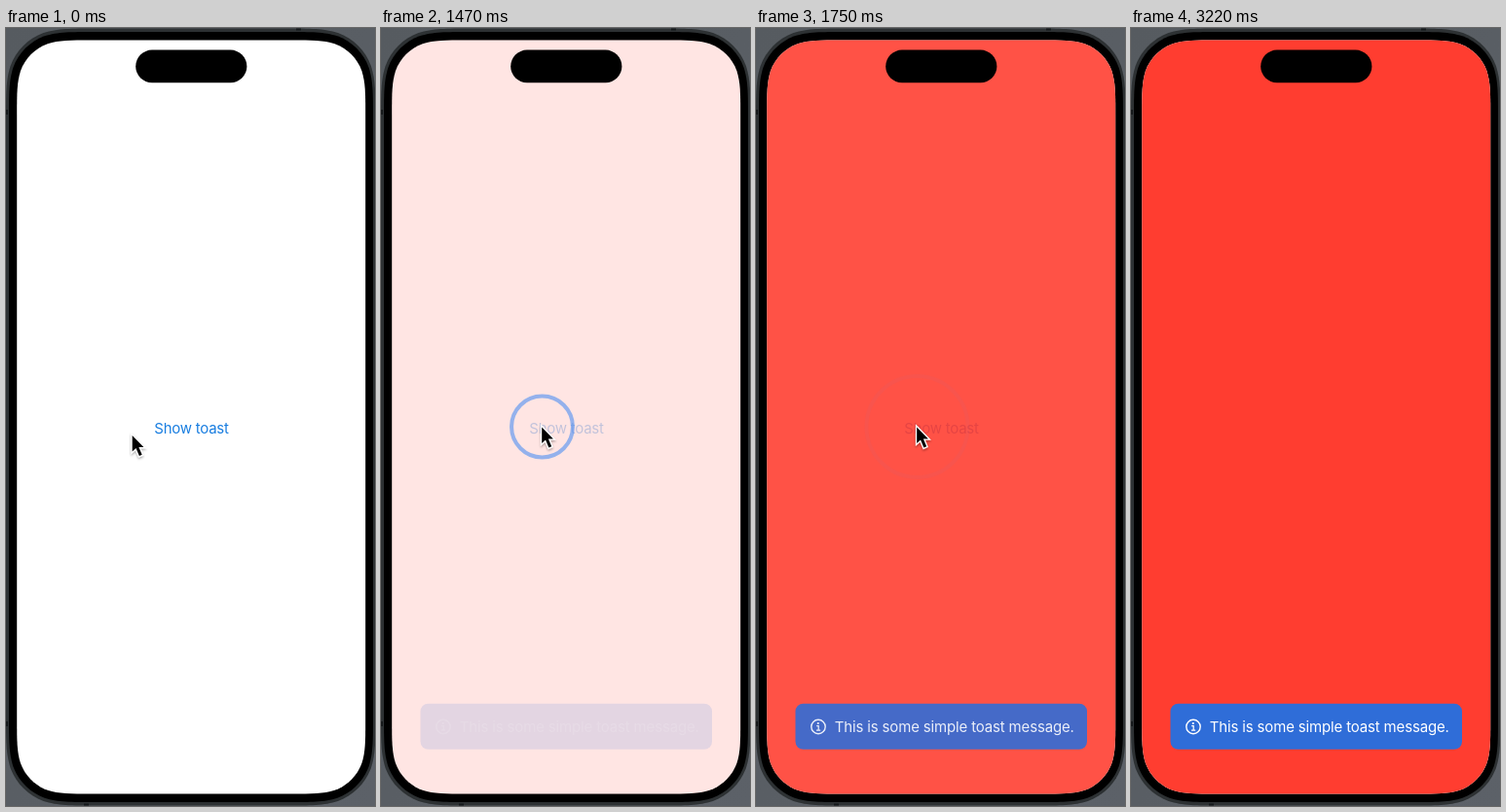
An HTML page for the animation above (3640 ms loop, 379x800 px).

```html
<!DOCTYPE html>
<html lang="en">
<head>
<meta charset="utf-8">
<title>Toast demo</title>
<style>
  html, body { margin: 0; width: 100%; height: 100%; overflow: hidden; background: #595e64; }
  svg { display: block; width: 100%; height: 100%; }
  text { font-family: Inter, "Liberation Sans", sans-serif; font-size: 15px; }
</style>
</head>
<body>
<svg viewBox="0 0 379 800">
  <defs>
    <linearGradient id="desk" x1="0" y1="0" x2="1" y2="1">
      <stop offset="0" stop-color="#565b60"/>
      <stop offset="1" stop-color="#5c6168"/>
    </linearGradient>
    <filter id="shadow" x="-50%" y="-50%" width="200%" height="200%">
      <feDropShadow dx="0" dy="1.5" stdDeviation="1.2" flood-opacity=".35"/>
    </filter>
  </defs>
  <rect width="379" height="800" fill="url(#desk)"/>
  <path id="body" fill="#2d3133"/>
  <path d="M298 1.5h5M80 798.5h5M1 84v5M1 713v5" stroke="#15181a" stroke-width="2"/>
  <path id="bezel"/>
  <path id="screen" fill="#fff"/>
  <text id="button" x="190.5" y="417" text-anchor="middle" fill="#1a7ee0" letter-spacing="-.25">Show toast</text>
  <path id="cover" fill="#ff3d30"/>
  <rect x="133.2" y="22.6" width="114.2" height="33.6" rx="16.8"/>
  <rect id="toast" x="40.5" y="694.7" width="299.5" height="47.1" rx="8" fill="#2f6dd8"/>
  <g id="label" fill="#fff">
    <circle cx="64" cy="718.5" r="7.2" fill="none" stroke="#fff" stroke-width="1.4"/>
    <circle cx="63.8" cy="715" r="1.1"/>
    <path d="M62.2 717.6h2v4.4M62 722.1h4.2" fill="none" stroke="#fff" stroke-width="1.2"/>
    <text x="80.8" y="724" letter-spacing="-.16">This is some simple toast message.</text>
  </g>
  <circle id="ring" cx="165.5" cy="410" fill="none" stroke="#3c87f5" stroke-width="4"/>
  <g id="cursor" filter="url(#shadow)">
    <path d="M1.2 2.9V19.6L5 16 8.4 24 11.2 22.8 7.9 15H12.9Z" stroke="#fff" stroke-width="2.6" paint-order="stroke"/>
  </g>
</svg>
<script>
const LOOP = 3640, STEP = 70;
const $ = id => document.getElementById(id);
const clamp = v => Math.min(1, Math.max(0, v));
const span = (t, a, b) => clamp((t - a) / (b - a));
const smooth = u => u * u * (3 - 2 * u);

// Half of a continuous corner, in radii: distance along each edge from the corner
const CORNER = [
  [0, 1.5287], [0, 1.0885], [0, 0.8684], [0.0749, 0.6315], [0.1691, 0.3728]
];

// Box with four continuous corners of radius r
function squircle(x, y, w, h, r) {
  const mirror = CORNER.map(([a, b]) => [b, a]).reverse();
  const curve = [...CORNER, ...mirror];
  const corner = (px, py, sx, sy, pts) =>
    pts.map(([a, b]) => `${px + sx * a * r} ${py + sy * b * r}`);
  const back = [...curve].reverse();
  const corners = [
    corner(x, y, 1, 1, curve),
    corner(x + w, y, -1, 1, back),
    corner(x + w, y + h, -1, -1, curve),
    corner(x, y + h, 1, -1, back)
  ];
  return 'M' + corners.map(([from, ...rest]) => `${from}C${rest.join(' ')}`).join('L') + 'Z';
}

// Critically damped spring, 0 to 1
function spring(ms) {
  const w = Math.max(0, ms) * 0.0112;
  return 1 - (1 + w) * Math.exp(-w);
}

$('body').setAttribute('d', squircle(0, 0.5, 379.5, 799, 61));
$('bezel').setAttribute('d', squircle(3, 4, 374, 792, 58));
for (const id of ['screen', 'cover'])
  $(id).setAttribute('d', squircle(11.2, 12.6, 358, 775, 50));

const fade = (id, v) => $(id).setAttribute('opacity', v.toFixed(3));

function draw(t) {
  const shown = spring(t - 1413);
  for (const id of ['cover', 'toast', 'label']) fade(id, shown);

  // Press dims the button, release brings it back
  fade('button', t < 1400 ? 1 : 0.2 + 0.8 * span(t, 1430, 1750));

  const age = t - 1400;
  $('ring').setAttribute('r', 26.3 + Math.max(0, age) * 0.0735);
  fade('ring', age < 0 ? 0 : 0.55 * (1 - span(t, 1540, 1765)));

  const come = smooth(span(t, 350, 840));
  const leave = span(t, 1890, 2310) ** 3.9;
  const x = 128.5 + 35.5 * come - 100 * leave;
  const y = 416 - 8.5 * come - 460 * leave;
  $('cursor').setAttribute('transform', `translate(${x.toFixed(2)} ${y.toFixed(2)})`);
  fade('cursor', t < 2310 ? 1 : 0);
}

const start = performance.now();
function tick() {
  const t = (performance.now() - start) % LOOP;
  draw(Math.floor(t / STEP) * STEP);
  requestAnimationFrame(tick);
}
tick();
</script>
</body>
</html>
```
